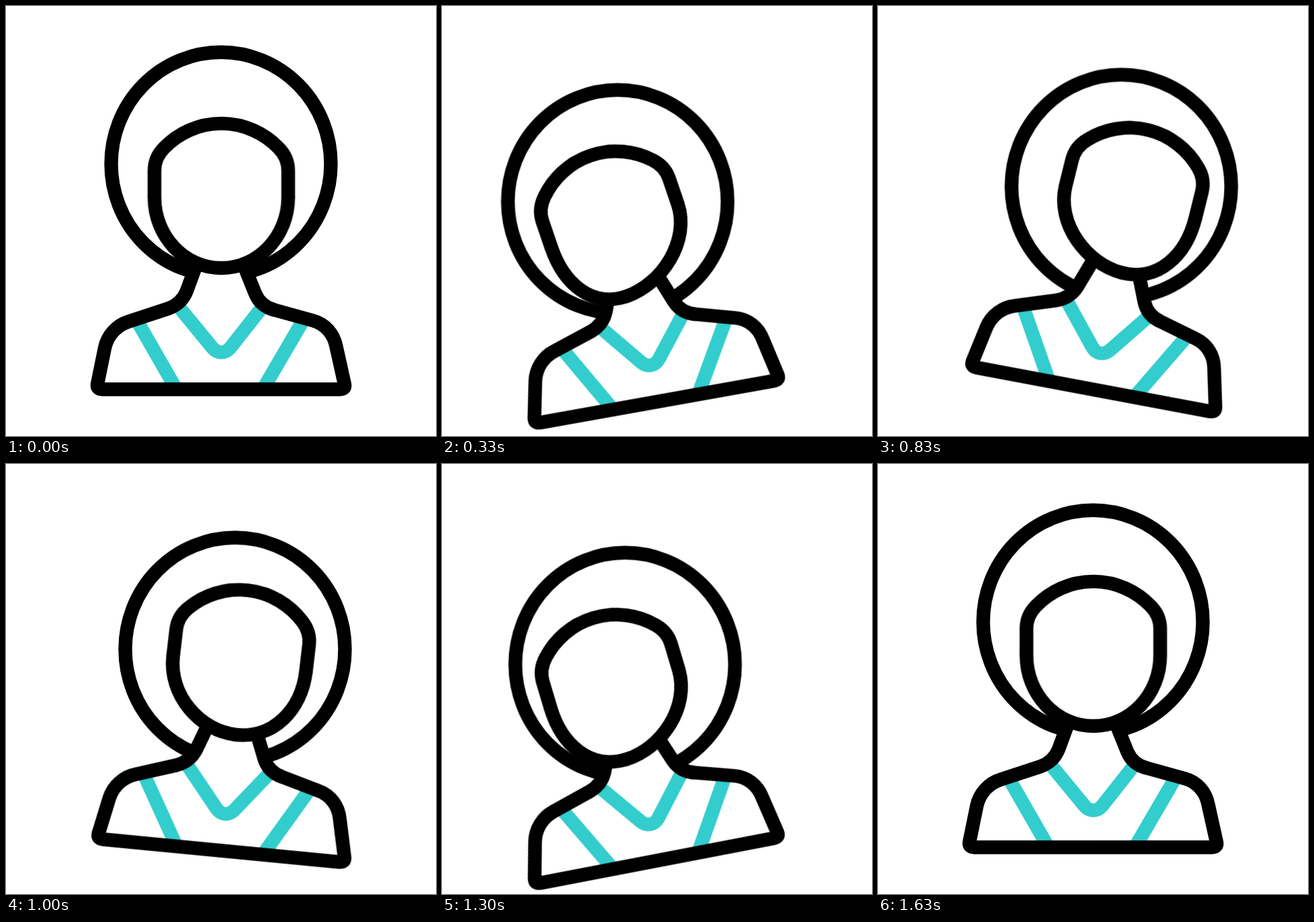
An HTML page that plays this animation: 640x640 px, repeating every 2 s.

```html
<!DOCTYPE html>
<html lang="en">
<head>
<meta charset="utf-8">
<title>Swaying woman</title>
<style>
  html, body { margin: 0; width: 100%; height: 100%; overflow: hidden; background: #fff; }
  svg { display: block; width: 100%; height: 100%; fill: #fff; stroke: #000; stroke-width: 20.4; }
  .dress { fill: none; stroke: #33cdcd; }

  .hair, .body, .face, .jaw {
    animation: 2s cubic-bezier(.333, 0, .667, 1) infinite;
  }
  .hair { animation-name: hair; }
  .body { animation-name: body; transform-origin: 320.5px 570.5px; }
  .face { animation-name: face; transform-origin: 0 0; }
  .jaw { animation-name: jaw; }

  /* rest, lean left, lean right, lean left, rest */
  @keyframes hair {
    0%, 81.667%, 100% { transform: translate(0, 0); }
    20% { transform: translate(-63.5px, 61px); }
    43.333% { transform: translate(44px, 33px); }
    63.9% { transform: translate(-48px, 64px); }
  }
  @keyframes body {
    0%, 81.667%, 100% { transform: translateY(0) rotate(0deg); }
    20%, 63.9% { transform: translateY(20px) rotate(-11deg); }
    43.333% { transform: translateY(0) rotate(11deg); }
  }
  /* swing around the base of the body, then tilt around the face itself */
  @keyframes face {
    0%, 81.667%, 100% { transform: translateY(0) rotate(0deg) translateY(-284.5px) rotate(0deg); }
    20% { transform: translateY(37.5px) rotate(-14deg) translateY(-284.5px) rotate(-6.4deg); }
    43.333% { transform: translateY(.5px) rotate(11.6deg) translateY(-284.5px) rotate(2.9deg); }
    63.9% { transform: translateY(43px) rotate(-13deg) translateY(-284.5px) rotate(-3.8deg); }
  }
  /* the chin drifts sideways as the head tilts */
  @keyframes jaw {
    0%, 81.667%, 100% { d: path("M-99.5 -1C-99.5 56.7 -55 104 0 104S99.5 56.7 99.5 -1"); }
    20% { d: path("M-99.5 -1C-99.5 56.7 -73 104.5 -18 104.5S99.5 56.7 99.5 -1"); }
    43.333% { d: path("M-99.5 -1C-99.5 56.7 -41 104.5 14 104.5S99.5 56.7 99.5 -1"); }
    63.9% { d: path("M-99.5 -1C-99.5 56.7 -69 104.5 -14 104.5S99.5 56.7 99.5 -1"); }
  }
</style>
</head>
<body>
<svg viewBox="0 0 640 640">
  <defs>
    <path id="bust" d="M287 375L269 424C264 437 254 446 241 450.5L183 469.5C165 475 151 490 147 509L136 563Q135 570.5 143.5 570.5H497Q505.5 570.5 504 563L491.5 507C488 488 475 473 456 468L400 452.5C386 449 376 440 371 428L350 376"/>
  </defs>

  <ellipse class="hair" cx="320" cy="235" rx="163.5" ry="166.2"/>

  <g class="body">
    <use href="#bust" stroke="none"/>
    <g class="dress">
      <path d="M197 472L251 566M441 470L385 566"/>
      <path d="M259 450L307.5 509Q313 515.5 320.5 515.5T333.5 509L380 450"/>
    </g>
    <use href="#bust" fill="none"/>
  </g>

  <g transform="translate(320.5 570.5)">
    <g class="face">
      <path d="M-99.5 0V-41C-99.5 -54 -95 -65 -85 -75A118 118 0 0 1 85 -75C95 -65 99.5 -54 99.5 -41V0"/>
      <path class="jaw" d="M-99.5 -1C-99.5 56.7 -55 104 0 104S99.5 56.7 99.5 -1"/>
    </g>
  </g>
</svg>
</body>
</html>
```
